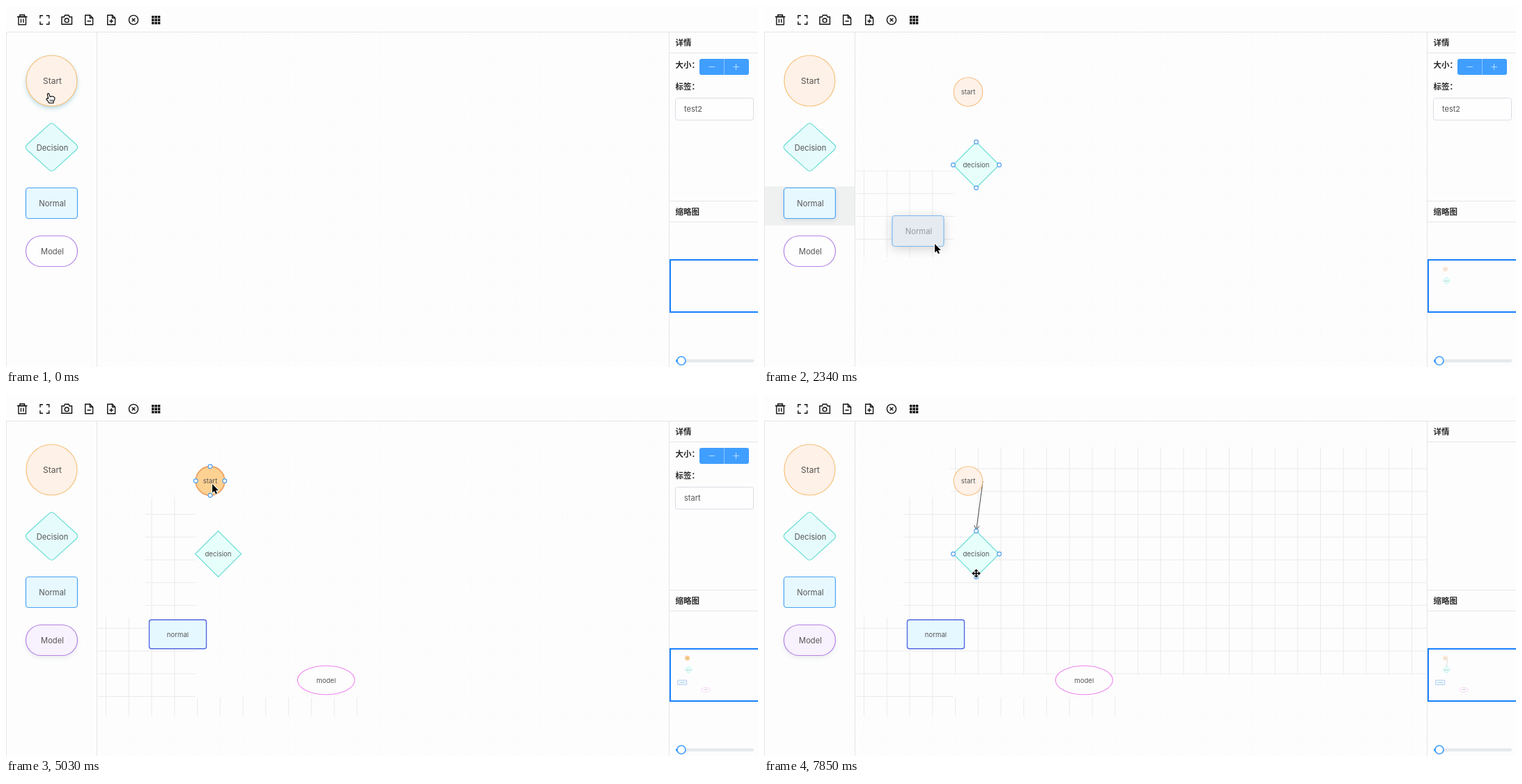
Animation of 1079x519 px, one loop 8 s. Source, as an HTML page with a canvas:

```html
<!DOCTYPE html>
<html lang="zh-CN">
<head>
<meta charset="utf-8">
<title>Flow editor</title>
<style>
html, body { margin: 0; width: 100%; height: 100%; overflow: hidden; background: #fdfdfd; }
canvas { display: block; }
</style>
</head>
<body>
<canvas id="stage" width="1079" height="519"></canvas>
<script>
const c = document.getElementById('stage').getContext('2d');
const LOOP = 8000, STEP = 148, LAST = 53;
const BG = '#fdfdfd', BLUE = '#409eff', INK = '#111';
const LATIN = 'Inter, "Liberation Sans", sans-serif';
const CJK = '"Noto Sans CJK SC", "Noto Sans CJK", sans-serif';

// All times below are counted in steps of the screen refresh.
const PAUSES = [29, 39, 40, 46];
const LINK = 36, ENTER = 41, RELEASE = 47;

// Stops of the pointer: step, x, y.
const STOPS = [[0, 62, 126], [5, 293, 123.5], [7, 72, 205], [9, 303, 228], [11, 304.5, 228.5],
  [14, 89, 302], [16, 245, 342], [18, 246.5, 344], [21, 102, 345], [24, 462, 413], [25, 459.5, 410],
  [30, 310, 140], [34, 296, 128], [36, 314, 124], [38, 311, 184], [41, 308.5, 212], [45, 304.5, 195], [53, 304.5, 256.5]];

// Palette entries; "grab" and "drop" bound the drag, "off" is the grab offset.
const ITEMS = [
  { kind: 'circle', text: 'Start', size: 12, x: 65.5, y: 107.5, w: 73, h: 73, fill: '#fef1e7', line: '#f6c27d',
    ghost: '#f3ece6', grab: 1, drop: 5, off: [3, -18] },
  { kind: 'diamond', text: 'Decision', size: 11.2, x: 65.5, y: 203, w: 79, h: 72, r: 5, fill: '#e6fbfc', line: '#6bdcd5',
    ghost: '#e3f0ee', grab: 8, drop: 10, off: [-6, -2] },
  { kind: 'rect', text: 'Normal', size: 11.2, x: 65.5, y: 283.5, w: 74, h: 44, r: 4, fill: '#e7f8ff', line: '#4aa3f5',
    ghost: '#e5ebf0', grab: 15, drop: 17, off: [-24, -18.5] },
  { kind: 'rect', text: 'Model', size: 11.2, x: 65.5, y: 352.5, w: 74, h: 44, r: 22, fill: '#f8f1fe', line: '#b485e6',
    ghost: '#efeaf1', grab: 22, drop: 25, off: [-38.5, 8] }
];

// Placed nodes, in the order of the palette.
const NODES = [
  { kind: 'circle', text: 'start', x: 293, y: 123.5, w: 41.5, h: 41.5, fill: '#fef1e8', line: '#f5bd7d',
    hotFill: '#fdd192', hotLine: '#eba261', hot: [30, LINK], again: [30, LINK] },
  { kind: 'diamond', text: 'decision', x: 304.5, y: 228.5, w: 66, h: 66, r: 0, fill: '#e6fffb', line: '#66dad2',
    hotFill: '#87e8de', hotLine: '#3fcfc6', hot: [ENTER, RELEASE], again: [ENTER, 99] },
  { kind: 'rect', text: 'normal', x: 246.5, y: 344, w: 82, h: 41.5, r: 3, fill: '#e6f8ff', line: '#5268e0', lw: 1.4 },
  { kind: 'ellipse', text: 'model', x: 459.3, y: 410, w: 82, h: 41.5, fill: BG, line: '#ee86ee' }
];
NODES.forEach((n, i) => {
  n.at = ITEMS[i].drop;
  n.until = i < 3 ? ITEMS[i + 1].drop : 34;
});

// Parts of the grid that stay visible: first step, x, y, width, height.
const PATCHES = [[25, 131, 320, 141, 141], [25, 200, 147, 72, 173], [25, 272, 435, 233, 26], [RELEASE, 268, 76, 684, 326]];

const within = (k, span) => span && k >= span[0] && k < span[1];
const dragged = k => ITEMS.find(o => k >= o.grab && k < o.drop);

function stepAt(ms) {
  let k = Math.min(LAST, Math.floor((ms + 30) / STEP));
  while (PAUSES.includes(k)) k--;
  return k;
}

function pointer(k) {
  const i = Math.max(1, STOPS.findIndex(s => s[0] >= k));
  const [k0, x0, y0] = STOPS[i - 1], [k1, x1, y1] = STOPS[i];
  const u = (k - k0) / (k1 - k0), e = u * u * (3 - 2 * u);
  return [x0 + (x1 - x0) * e, y0 + (y1 - y0) * e];
}

function lines(color, width, ...polys) {
  c.strokeStyle = color;
  c.lineWidth = width;
  c.beginPath();
  for (const p of polys)
    for (let i = 0; i < p.length; i += 2) c[i ? 'lineTo' : 'moveTo'](p[i], p[i + 1]);
  c.stroke();
}

function ring(x, y, r) {
  c.beginPath();
  c.arc(x, y, r, 0, 7);
  c.stroke();
}

function bar(color, x, y, w, h, r) {
  c.fillStyle = color;
  c.beginPath();
  c.roundRect(x, y, w, h, r);
  c.fill();
}

function label(s, x, y, size, color, align = 'center') {
  c.font = `${size}px ${LATIN}`;
  c.fillStyle = color;
  c.textAlign = align;
  c.fillText(s, x, y);
}

function heading(s, y) {
  c.font = `bold 11.5px ${CJK}`;
  c.fillStyle = '#2b2b2b';
  c.textAlign = 'left';
  c.fillText(s, 960.5, y);
}

function shape(o, x, y) {
  const a = o.w / 2, b = o.h / 2;
  c.beginPath();
  if (o.kind === 'rect') c.roundRect(x - a, y - b, o.w, o.h, o.r);
  else if (o.kind !== 'diamond') c.ellipse(x, y, a, b, 0, 0, 7);
  else {
    const tips = [[x, y - b], [x + a, y], [x, y + b], [x - a, y]];
    c.moveTo(x - a / 2, y - b / 2);
    tips.forEach((p, i) => c.arcTo(...p, ...tips[(i + 1) % 4], o.r));
    c.closePath();
  }
}

function paint(fill, line, width, shadow, blur = 0) {
  c.save();
  if (shadow) {
    c.shadowColor = shadow;
    c.shadowBlur = blur;
    c.shadowOffsetY = 3;
  }
  c.fillStyle = fill;
  c.fill();
  c.restore();
  c.strokeStyle = line;
  c.lineWidth = width;
  c.stroke();
}

function mesh(color, dash) {
  const gap = 32.75;
  c.setLineDash(dash);
  for (let x = 143.5; x < 952; x += gap) lines(color, 1, [x, 38, x, 519]);
  for (let y = 40.5; y < 519; y += gap) lines(color, 1, [131, y, 952, y]);
  c.setLineDash([]);
}

function grid(k, pos) {
  mesh('#f2f2f2', [1, 5.55]);
  c.save();
  c.beginPath();
  for (const [from, ...box] of PATCHES) if (k >= from) c.rect(...box);
  const o = dragged(k);
  if (o) {
    const top = o.y - o.h / 2 - 25;
    const right = pos[0] + o.off[0] + o.w / 2 + 14, bottom = pos[1] + o.off[1] + o.h / 2 + 16;
    c.rect(131, top, Math.max(0, right - 131), Math.max(0, bottom - top));
  }
  c.clip();
  mesh('#ebebeb', []);
  c.restore();
}

function palette(k) {
  ITEMS.forEach((o, i) => {
    const model = i === 3, hover = k >= o.grab - 1 && (model || k < o.drop);
    if (o === dragged(k)) bar('#eff0f0', 1, o.y - o.h / 2 - 2, 129, o.h + 12, 0);
    shape(o, o.x, o.y);
    paint(model && !hover ? '#fefefe' : o.fill, o.line, 1.2,
      hover && (i ? 'rgba(90,110,140,.14)' : 'rgba(70,160,190,.4)'), 6);
    label(o.text, o.x + 1, o.y + 4.8, o.size, '#555');
  });
}

function ghost(k, [px, py]) {
  const o = dragged(k);
  if (!o) return;
  const x = px + o.off[0], y = py + o.off[1];
  shape(o, x, y);
  paint(o.ghost, o.line + 'aa', 1.2, 'rgba(0,0,0,.18)', 15);
  label(o.text, x + 1, y + 4.8, o.size, '#95999b');
}

function handles(o) {
  for (const sx of [-1, 0, 1]) for (const sy of [-1, 0, 1]) {
    const sides = Math.abs(sx) + Math.abs(sy);
    if (!sides || sides === 2 && o.kind !== 'rect') continue;
    c.beginPath();
    c.arc(o.x + sx * o.w / 2, o.y + sy * o.h / 2, 2.9, 0, 7);
    paint('#fff', '#4a9bea', 1.1);
  }
}

function graph(k, pos, mini) {
  if (k > LINK) {
    const done = k >= RELEASE;
    lines('#333', .9, [314, 124, ...(done ? [304.8, 193] : pos)]);
    if (done) lines('#333', .9, [301.6, 187.3, 304.6, 193.6, 309, 188.4]);
  }
  for (const o of NODES) {
    if (k < o.at) continue;
    const hot = within(k, o.hot);
    shape(o, o.x, o.y);
    paint(hot ? o.hotFill : o.fill, hot ? o.hotLine : o.line, mini ? 2 : hot ? 1.8 : o.lw || 1.1);
    label(o.text, o.x, o.y + 3.6, 9.6, '#555');
    if (!mini && (k < o.until || within(k, o.again))) handles(o);
  }
}

function toolbar() {
  const pen = (...polys) => lines(INK, 1.4, ...polys);
  // bin
  pen([16, 15.5, 30.5, 15.5], [21.5, 18.5, 21.5, 24], [25, 18.5, 25, 24]);
  c.strokeRect(18, 15.5, 10.5, 11.3);
  c.strokeRect(20, 12.7, 6.5, 2.8);
  // full screen
  for (const sx of [-1, 1]) for (const sy of [-1, 1]) {
    const x = 55.4 + sx * 6.4, y = 20 + sy * 6.3;
    pen([x - sx * 4, y, x, y, x, y - sy * 4]);
  }
  // camera
  pen([80, 15.7, 83.5, 15.7, 84.5, 13.2, 90, 13.2, 91, 15.7, 94.5, 15.7, 94.5, 26.3, 80, 26.3, 80, 15]);
  ring(87.2, 20.7, 2.9);
  // pages
  for (const x of [119, 151]) {
    pen([x + 1.5, 13.2, x - 5.3, 13.2, x - 5.3, 26.8, x + 5.6, 26.8, x + 5.6, 17.3, x + 1.5, 13.2, x + 1.5, 17.3, x + 5.6, 17.3],
      [x - 2.5, 21.7, x + 2.8, 21.7]);
    if (x > 119) pen([x + .1, 19, x + .1, 24.4]);
  }
  // close
  pen([180.7, 17.7, 185.3, 22.3], [185.3, 17.7, 180.7, 22.3]);
  ring(183, 20, 6.6);
  // tiles
  for (let i = 0; i < 9; i++) bar(INK, 209 + i % 3 * 4.4, 14 + Math.floor(i / 3) * 4.4, 3.5, 3.5, 0);
}

function details(k) {
  heading('详情', 56.5);
  heading('缩略图', 299.5);
  if (within(k, [LINK, ENTER]) || k >= RELEASE) return;
  heading('大小：', 88.5);
  heading('标签：', 119.5);
  bar(BLUE, 995, 76, 71, 23, 3);
  lines('#8cc5ff', 1, [1030.5, 76, 1030.5, 99]);
  lines('#b9dcff', 1, [1008.5, 87.5, 1017, 87.5], [1043.5, 87.5, 1052, 87.5], [1047.5, 83, 1047.5, 92]);
  c.beginPath();
  c.roundRect(960.5, 132.5, 112, 31.5, 3);
  paint('#fefefe', '#dadde5', 1);
  label(k < 34 ? 'test2' : k < ENTER ? 'start' : 'decision', 973, 152.3, 11, '#555', 'left');
}

function minimap(k, pos) {
  c.save();
  c.translate(931, 358.6);
  c.scale(.159, .159);
  graph(k, pos, true);
  c.restore();
  lines('#1980ff', 2, [1080, 365, 953, 365, 953, 440, 1080, 440]);
  bar('#e6e8ec', 961, 508, 112, 4.5, 2);
  bar(BLUE, 961, 508, 9, 4.5, 2);
  c.beginPath();
  c.arc(969, 510, 6, 0, 7);
  paint('#fff', BLUE, 1.7);
}

function moveCursor() {
  for (const [color, grow] of [['#fff', 1.2], ['#000', 0]]) {
    c.fillStyle = color;
    for (let i = 0; i < 4; i++) {
      c.rotate(Math.PI / 2);
      c.beginPath();
      c.moveTo(0, -6.3 - grow);
      c.lineTo(3 + grow, -3 + grow / 2);
      c.lineTo(-3 - grow, -3 + grow / 2);
      c.fill();
      c.fillRect(-.8 - grow, -4, 1.6 + grow * 2, 4);
    }
  }
}

function handCursor() {
  c.beginPath();
  c.moveTo(-1.2, 7.5);
  c.lineTo(-2.6, 1);
  c.quadraticCurveTo(-1.6, -1.6, -.2, .4);
  c.lineTo(1.2, 4.5);
  c.quadraticCurveTo(6, 2.5, 8, 6);
  c.quadraticCurveTo(8, 9.5, 6, 11.5);
  c.lineTo(6, 13.5);
  c.lineTo(-.2, 13.5);
  c.quadraticCurveTo(-1.6, 10.5, -4, 8.3);
  c.quadraticCurveTo(-4, 5.6, -1.2, 7.5);
  paint('#fff', INK, 1.2);
  for (const x of [1.3, 3.2, 5]) lines(INK, .9, [x, 8.5, x, 11.5]);
}

function arrowCursor() {
  lines('#fff', 1.8, [0, 0, 0, 12.5, 2.8, 10, 4.9, 14.3, 7, 13.3, 5, 9.2, 8.8, 9, 0, 0]);
  c.fillStyle = '#000';
  c.fill();
}

function cursor(k, [x, y]) {
  c.save();
  c.translate(x, y);
  c.lineJoin = 'round';
  if (k >= ENTER) moveCursor();
  else if (x < 103 && !dragged(k)) handCursor();
  else arrowCursor();
  c.restore();
}

function frame(ms) {
  const k = stepAt(ms), pos = pointer(k);
  bar(BG, 0, 0, 1079, 519, 0);
  grid(k, pos);
  bar(BG, 0, 0, 1079, 37, 0);
  lines('#e6e6e6', 1, [0, 37.5, 1079, 37.5]);
  for (const x of [.5, 130.5, 951.5]) lines('#e6e6e6', 1, [x, 38, x, 519]);
  for (const y of [67.5, 280.5, 310.5]) lines('#e6e6e6', 1, [952, y, 1079, y]);
  toolbar();
  palette(k);
  details(k);
  minimap(k, pos);
  graph(k, pos, false);
  ghost(k, pos);
  cursor(k, pos);
}

const begin = performance.now();
function tick() {
  frame((performance.now() - begin) % LOOP);
  requestAnimationFrame(tick);
}
tick();
</script>
</body>
</html>
```
